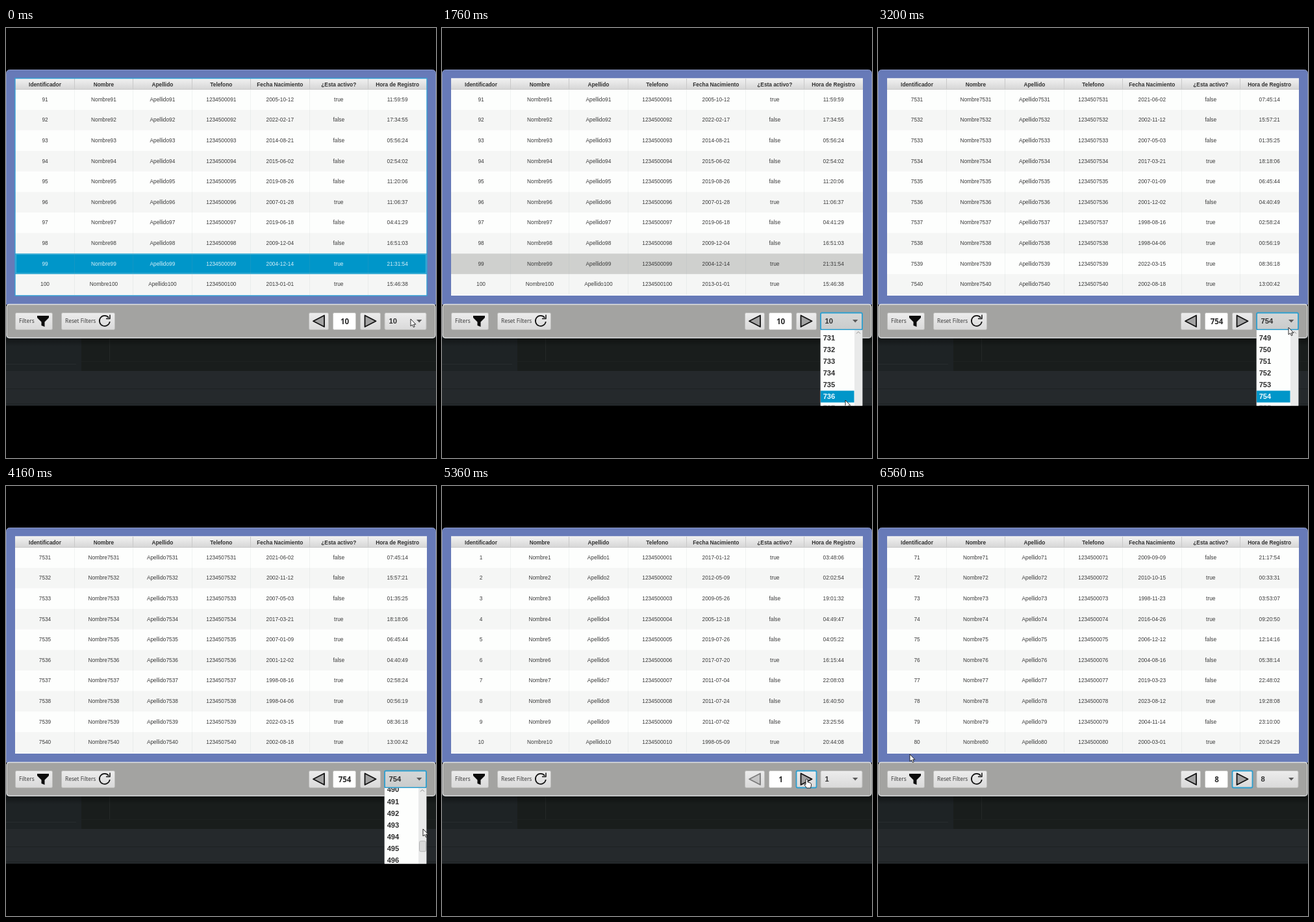
Recreate the animation shown at these times as an HTML page with a canvas. Size 662 by 662 pixels, loop 6.64 s.

```html
<!DOCTYPE html>
<html lang="es">
<head>
<meta charset="utf-8">
<style>
html, body { margin: 0; width: 100%; height: 100%; overflow: hidden; background: #000; }
canvas { display: block; }
</style>
</head>
<body>
<canvas id="stage" width="662" height="662"></canvas>
<script>
const g = document.getElementById('stage').getContext('2d');
const LOOP = 6640, STEP = 80;
const SANS = '"Liberation Sans", Arial, sans-serif', HUMAN = '"Open Sans", sans-serif';
const HEADS = ['Identificador', 'Nombre', 'Apellido', 'Telefono', 'Fecha Nacimiento', '¿Esta activo?', 'Hora de Registro'];
const COL = 90.45, ROW = 31.6, TOP = 94.5, ITEM = 18.1, LIST = 467.5;
const PICK_LAST = 2400, PICK_FIRST = 4880, CLICKS = 5390, CLICK_GAP = 130;

// [time, x, y] of the pointer
const POINTER = [[0, 623, 448], [720, 634, 455], [960, 640, 570], [1040, 622, 551], [1760, 621, 573],
  [2400, 621, 573], [2720, 642, 442], [3200, 632, 461], [3760, 642, 567], [4080, 642, 567],
  [4160, 642, 528], [4720, 608, 485], [4880, 608, 485], [5280, 562, 452], [6320, 562, 452], [6560, 49, 413]];
// [time, first item] of the open list
const SCROLL = [[0, 5], [800, 5], [1040, 695], [2120, 749], [3600, 749], [4160, 490.5], [4400, 1]];

function at(keys, t) {
  const i = keys.findIndex(k => k[0] > t);
  if (i < 0) return keys[keys.length - 1].slice(1);
  const a = keys[i - 1], b = keys[i], f = (t - a[0]) / (b[0] - a[0]);
  return a.slice(1).map((v, j) => v + (b[j + 1] - v) * f);
}

function pageAt(t) {
  if (t < PICK_LAST) return 10;
  if (t < PICK_FIRST) return 754;
  return Math.min(8, 1 + Math.max(0, Math.floor((t - CLICKS) / CLICK_GAP)));
}

function rect(x, y, w, h, fill) {
  g.fillStyle = fill;
  g.fillRect(x, y, w, h);
}

function round(x, y, w, h, r, fill, stroke, lw = 1) {
  g.beginPath();
  g.roundRect(x, y, w, h, r);
  if (fill) { g.fillStyle = fill; g.fill(); }
  if (stroke) { g.strokeStyle = stroke; g.lineWidth = lw; g.stroke(); }
}

function shade(y, h, from, to) {
  const s = g.createLinearGradient(0, y, 0, y + h);
  s.addColorStop(0, from);
  s.addColorStop(1, to);
  return s;
}

function text(s, x, y, font, fill, align = 'center') {
  g.font = font;
  g.fillStyle = fill;
  g.textAlign = align;
  g.fillText(s, x, y);
}

function shape(path, fill, stroke, lw, x = 0, y = 0) {
  const p = new Path2D(path);
  g.save();
  g.translate(x, y);
  g.lineJoin = 'round';
  if (fill) { g.fillStyle = fill; g.fill(p); }
  if (stroke) { g.strokeStyle = stroke; g.lineWidth = lw; g.stroke(p); }
  g.restore();
}

function clipTo(x, y, w, h, paint) {
  g.save();
  g.beginPath();
  g.rect(x, y, w, h);
  g.clip();
  paint();
  g.restore();
}

function button(x, w, focus, pressed) {
  const fill = pressed ? shade(438, 27, '#d6d8d8', '#c9cbcb') : shade(438, 27, '#ededed', '#d9d9d9');
  round(x + .5, 438.5, w - 1, 26, 2, fill, focus ? '#2c9fd0' : '#bdbdbb', focus ? 1.8 : 1);
}

function backdrop() {
  rect(0, 0, 662, 662, '#000');
  rect(0, 470, 662, 111.5, '#25292c');
  rect(0, 470, 116, 58, '#1e2325');
  rect(116, 470, 546, 58, '#191d1c');
  rect(159, 478, 1, 35, '#242827');
  rect(116, 513, 546, 1, '#1e2221');
  rect(0, 517, 108, 1, '#272c2e');
  rect(0, 555, 662, 1, '#1d2123');
  rect(0, 578, 662, 1, '#1e2224');
  rect(0, 478, 662, 12, shade(478, 12, 'rgba(0,0,0,.4)', 'rgba(0,0,0,0)'));
}

// Seeded birth date, flag and time for one record
function record(id) {
  let k = 0;
  const pick = (lo, n) => {
    const s = Math.sin(id * 12.9898 + ++k * 78.233) * 43758.5453;
    return String(lo + Math.floor((s - Math.floor(s)) * n)).padStart(2, '0');
  };
  return [id, 'Nombre' + id, 'Apellido' + id, '12345' + String(id).padStart(5, '0'),
    [pick(1998, 26), pick(1, 12), pick(1, 28)].join('-'),
    pick(0, 2) === '01' ? 'true' : 'false',
    [pick(0, 24), pick(0, 60), pick(0, 60)].join(':')];
}

function table(page, focused) {
  round(.5, 64.5, 661, 361, [5, 5, 0, 0], '#677ab8', '#8b98c4');
  rect(14, 77.5, 634, 334.5, '#fdfefd');
  rect(14, 77.5, 634, 17, shade(78, 17, '#f1f1f1', '#d5d5d5'));
  HEADS.forEach((h, i) => text(h, 60 + COL * i, 89.5, 'bold 8.3px ' + SANS, '#303030'));
  for (let i = 0; i < 10; i++) {
    const y = TOP + ROW * i, picked = page === 10 && i === 8, blue = picked && focused;
    rect(14, y, 634, ROW, blue ? '#0096c9' : picked ? '#cfd0ce' : i % 2 ? '#f5f6f5' : '#fdfefd');
    if (blue) {
      g.setLineDash([1, 1]);
      round(15.5, Math.round(y) + 1.5, 631, 29, 0, null, '#8ccbe2');
      g.setLineDash([]);
    }
    record(page * 10 - 9 + i).forEach((v, j) =>
      text(v, 60 + COL * j, y + 18.3, '8.3px ' + SANS, blue ? '#d9f0f8' : '#3a3a3a'));
  }
  for (let i = 1; i < HEADS.length; i++) {
    const x = Math.round(14.5 + COL * i);
    rect(x, 78, 1, 17, '#c9c9c9');
    rect(x, 95, 1, 316, 'rgba(150,160,160,.12)');
  }
  rect(14, 94, 634, 1, '#cbcbcb');
  if (focused) round(14, 77.5, 634, 334.5, 0, null, '#36a0d4', 1.4);
}

function toolbar(page, comboFocus, comboOpen, nextFocus) {
  round(1, 425.5, 660, 51.5, 4, '#a3a3a1', '#dfe1e2', 1.3);
  button(14, 58);
  text('Filters', 20, 454.3, '8.4px ' + HUMAN, '#333', 'left');
  shape('M48 443H66V446L59.5 452.5V460L54.5 458V452.5L48 446Z', '#0c0c0c');
  button(85, 83);
  text('Reset Filters', 91, 454.3, '8.4px ' + HUMAN, '#333', 'left');
  shape('M158.2 446A8 8 0 1 0 159.8 452', null, '#111', 1.7);
  shape('M154 447.5H160V441.5', null, '#111', 1.5);
  button(466, 31);
  g.globalAlpha = page === 1 ? .45 : 1;
  shape('M473 451.3L490 442.5V460Z', '#a2a2a2', '#111', 1.8);
  g.globalAlpha = 1;
  round(503.5, 438.5, 35, 26, 2, '#fff', '#c3c3c1');
  text(page, 521.5, 455.7, 'bold 11.5px ' + HUMAN, '#2b2b2b');
  button(545, 32, nextFocus);
  shape('M552.5 442.5L569.5 451.3L552.5 460Z', '#a2a2a2', '#111', 1.8);
  button(582.5, 65, comboFocus, comboOpen);
  text(page, 589.5, 455.2, 'bold 11.2px ' + SANS, '#2f2f2f', 'left');
  shape('M632 449H640.4L636.2 453.5Z', '#5a5a5a');
}

function dropdown(first, hot) {
  clipTo(582.5, 465, 65, 116.5, () => {
    rect(582, 465, 66, 117, '#c4c6c6');
    rect(583, 465, 52, 117, '#fdfefd');
    rect(635, 465, 12, 117, '#e9eaea');
    shape('M638 470.5L641 467.5L644 470.5', null, '#8d8d8d', 1);
    round(636.5, 475 + (first - 1) * .1465, 10, 16, 2, '#d8d9d9', '#b3b4b4');
    for (let n = Math.floor(first); n < first + 8; n++) {
      const y = LIST + (n - first) * ITEM;
      if (n === hot) rect(583, y + .4, 51.5, ITEM, '#0096c9');
      text(n, 586.7, y + 13, 'bold 11px ' + SANS, n === hot ? '#f0faff' : '#2c2c2c', 'left');
    }
  });
}

function pointer(x, y, hand) {
  if (hand) shape('M-2 0Q0 -2 1 0V4L5 5Q7 6 6.5 9L5.5 13H-.5L-4 8Q-4 6 -2 7.5Z', '#fff', '#111', .9, x, y);
  else shape('M0 0V11L2.6 8.8L4.4 12.6L6.2 11.8L4.5 8.2H7.8Z', '#fff', '#111', .9, x, y);
}

function draw(now) {
  const t = Math.floor(now % LOOP / STEP) * STEP;
  const [x, y] = at(POINTER, t), [scroll] = at(SCROLL, t);
  const page = pageAt(t);
  const open = t >= 160 && t < PICK_LAST || t >= 3200 && t < PICK_FIRST;
  backdrop();
  table(page, t < 160);
  toolbar(page, t >= 160 && t < 5280, open, t >= 5280);
  if (open) {
    // The wheel moves whole items, the thumb moves freely; the highlight trails the pointer
    const first = t < 3600 ? Math.round(scroll) : scroll;
    const hover = x < 630 && y > 470;
    dropdown(first, hover ? Math.floor(first + Math.max(0, y - 12 - LIST) / ITEM) : page);
  }
  clipTo(0, 64, 662, 517.5, () => pointer(x, y, t >= 5280 && t <= 6320));
  requestAnimationFrame(draw);
}
requestAnimationFrame(draw);
</script>
</body>
</html>
```
